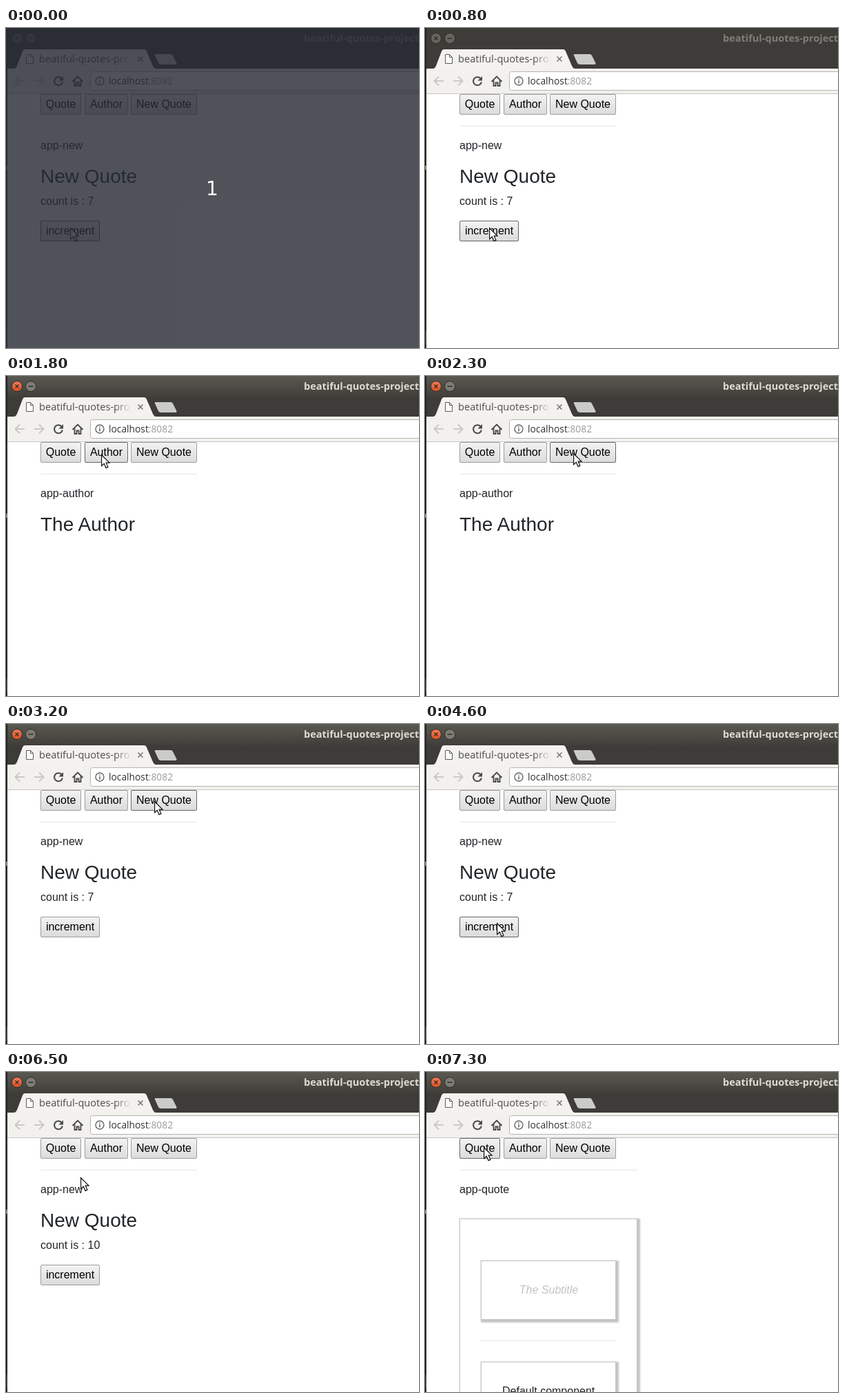
Recreate the animation shown at these times as an HTML page. Size 599 by 465 pixels, loop 8 s.

```html
<!DOCTYPE html>
<html lang="en">
<head>
<meta charset="utf-8">
<title>Quotes demo</title>
<style>
  html, body { margin: 0; width: 100%; height: 100%; overflow: hidden; background: #fff; }
  svg { display: block; }
  text { white-space: pre; }
  .ui { font-family: "Open Sans", "Noto Sans", sans-serif; }
  .page { font: 16px "Liberation Sans", Arial, sans-serif; fill: #212529; }
  .h2 { font-size: 28px; }
  .btn text { fill: #000; }
  .btn rect { fill: url(#face); stroke: #9c9c9c; }
  .btn.hover rect { stroke: #666; }
  .btn.down rect { fill: url(#faceDown); }
  .rule { fill: #e5e5e5; }
  .card rect { fill: #fff; stroke: #c8c8c8; }
  .card .shade { fill: #c4c4c4; stroke: none; filter: url(#soft); }
  .icon { fill: none; stroke: #484846; stroke-width: 2; }
  .off { stroke: #c9c9c5; }
</style>
</head>
<body>
<svg width="599" height="465" viewBox="0 0 599 465">
  <defs>
    <linearGradient id="bar" x2="0" y2="1">
      <stop stop-color="#5a5951"/><stop offset="1" stop-color="#3f3e39"/>
    </linearGradient>
    <linearGradient id="face" x2="0" y2="1">
      <stop stop-color="#f3f3f3"/><stop offset="1" stop-color="#dbdbdb"/>
    </linearGradient>
    <linearGradient id="faceDown" x2="0" y2="1">
      <stop stop-color="#d6d6d6"/><stop offset="1" stop-color="#ececec"/>
    </linearGradient>
    <linearGradient id="tabText" gradientUnits="userSpaceOnUse" x1="158" x2="182">
      <stop stop-color="#4c4b49"/><stop offset="1" stop-color="#4c4b49" stop-opacity="0"/>
    </linearGradient>
    <linearGradient id="orange" x2="0" y2="1">
      <stop stop-color="#f37f57"/><stop offset="1" stop-color="#dd4f22"/>
    </linearGradient>
    <filter id="soft" x="-10%" y="-10%" width="120%" height="120%"><feGaussianBlur stdDeviation="1"/></filter>
    <clipPath id="tabClip"><rect x="46" y="32" width="136" height="26"/></clipPath>
  </defs>

  <rect width="599" height="465" fill="#fff"/>
  <rect width="599" height="59" fill="#3d3c38"/>
  <rect id="bar-lit" width="599" height="31" fill="url(#bar)"/>
  <rect width="2" height="465" fill="#242321"/>
  <rect y="200" width="1.5" height="6" fill="#a39a8c"/>
  <rect y="440" width="2" height="20" fill="#3a3936"/>

  <!-- window controls -->
  <g stroke="#2f2e2a">
    <circle id="close" cx="16" cy="15" r="7.5"/>
    <circle id="mini" cx="36" cy="15" r="7.5"/>
    <path d="M13.5 12.5l5 5m0-5l-5 5M32.500 15h7" stroke-width="1.4"/>
  </g>
  <text id="title" class="ui" x="432" y="20" font-size="14.5" font-weight="700">beatiful-quotes-project</text>

  <!-- tab strip -->
  <path d="M12 59Q15 58 16 55L24 34Q25 31 28 31H200Q203 31 204 34L213 55Q214 58 217 59Z" fill="#f4f2f0"/>
  <path d="M217 38H239Q241 38 242 40L247.500 51Q248 53 246 53H225Q222 53 221 51L216 40Q215 38 217 38Z" fill="#cbcbc7"/>
  <path d="M29.500 38.500h6l4 4v9h-10zM35.500 38.500v4h4" fill="#fbfbfa" stroke="#5c5c5a"/>
  <g clip-path="url(#tabClip)">
    <text class="ui" x="48" y="50" font-size="14.6" fill="url(#tabText)">beatiful-quotes-project</text>
  </g>
  <path d="M191.500 41.500l7 7m0-7l-7 7" class="icon" stroke-width="1.6" style="stroke:#777;stroke-width:1.6"/>

  <!-- toolbar -->
  <rect x="2" y="59" width="597" height="36" fill="#f2f1ed"/>
  <rect x="2" y="95" width="597" height="1" fill="#c9c8c4"/>
  <path class="icon off" d="M27 77H14M20 70.500L13.500 77L20 83.500M41 77H54M48 70.500L54.500 77L48 83.500"/>
  <path class="icon" d="M80.500 73.200A6 6 0 1 0 81.900 78.500"/>
  <path d="M83 70v6.500h-6.500z" fill="#484846"/>
  <path class="icon" stroke-linejoin="miter" d="M96.500 78L104 70.500L111.500 78M99.500 76V84H102.500V79.500H105.500V84H108.500V76" style="stroke-width:1.8"/>
  <rect x="122.500" y="63.500" width="490" height="27" rx="3" fill="#fff" stroke="#b4b3af"/>
  <circle cx="136" cy="77" r="6" class="icon" style="stroke:#666;stroke-width:1.4"/>
  <path d="M135.200 76h1.600v4.500h-1.600zM135.200 73.200h1.600v1.600h-1.600z" fill="#666"/>
  <text class="ui" x="149" y="82" font-size="13.8" fill="#30302e">localhost<tspan fill="#999895">:8082</tspan></text>

  <g class="page">
    <g id="buttons"></g>
    <rect id="rule" class="rule" x="50" y="142" height="1"/>
    <text id="name" x="50" y="176"></text>
    <text id="head" class="h2" x="50" y="225"></text>
    <text id="count" x="50" y="257"></text>
    <g id="quote">
      <g class="card" id="cards"></g>
      <rect class="rule" x="81" y="390" width="196" height="1"/>
      <text x="179.500" y="322" text-anchor="middle" font-style="italic" style="fill:#c4c4c4">The Subtitle</text>
      <text x="112" y="469">Default component</text>
    </g>
  </g>

  <path id="cursor" d="M.6.8V16.600L4.300 13.200L7 19.600L9.900 18.400L7.200 12.200H12Z" fill="#fff" stroke="#111" stroke-width="1.2"/>

  <g id="intro">
    <rect width="599" height="465" fill="#272b33" fill-opacity=".81"/>
    <text x="299" y="243" text-anchor="middle" fill="#fff" style="font:28px 'DejaVu Sans',sans-serif">1</text>
  </g>
</svg>
<script>
const LOOP = 8000;
const $ = id => document.getElementById(id);

function add(parent, tag, attrs, text = '') {
  const el = document.createElementNS('http://www.w3.org/2000/svg', tag);
  for (const k in attrs) el.setAttribute(k, attrs[k]);
  el.textContent = text;
  return parent.appendChild(el);
}

// label, x, y, width, [pressed from, to]
const buttons = [
  ['Quote', 50, 96, 59, [7100, 7300]],
  ['Author', 114, 96, 63, [1600, 1800]],
  ['New Quote', 181, 96, 96, [0, 0]],
  ['increment', 50, 280, 86, [5100, 5200]]
].map(([label, x, y, w, press]) => {
  const el = add($('buttons'), 'g', {});
  add(el, 'rect', { x: x + .5, y: y + .5, width: w - 1, height: 29, rx: 1.5 });
  add(el, 'text', { x: x + w / 2, y: y + 20, 'text-anchor': 'middle' }, label);
  return { el, x, y, w, press };
});

for (const [x, y, w, h] of [[50, 213, 258, 300], [81, 274, 196, 86], [81, 421, 196, 86]]) {
  add($('cards'), 'rect', { class: 'shade', x, y, width: w + 4, height: h + 4 });
  add($('cards'), 'rect', { x: x + .5, y: y + .5, width: w - 1, height: h - 1 });
}

// Each row holds from its time until the next one.
const pointer = [
  [0, 93, 290], [1100, 100, 226], [1200, 112, 151], [1400, 134, 121], [1500, 138, 114],
  [1900, 148, 114], [2000, 166, 113], [2100, 188, 113], [2200, 207, 112], [2300, 215, 112],
  [4100, 216, 156], [4300, 192, 188], [4400, 152, 240], [4500, 115, 279], [4600, 104, 289],
  [6200, 112, 236], [6300, 120, 170], [6500, 108, 153], [6600, 98, 130], [6700, 88, 113], [6800, 85, 109]
];
const views = [[0, 'new'], [1800, 'author'], [3200, 'new'], [7300, 'quote']];
const counts = [[0, 7], [5200, 8], [5600, 9], [5800, 10]];
const heads = { new: 'New Quote', author: 'The Author', quote: '' };

const at = (steps, t) => steps.filter(s => s[0] <= t).pop();
const show = (el, on) => { el.style.display = on ? '' : 'none'; };

function draw(t) {
  const [, x, y] = at(pointer, t);
  const view = at(views, t)[1];
  const lit = t >= 1600;

  $('cursor').setAttribute('transform', `translate(${x} ${y})`);
  for (const b of buttons) {
    const hover = x >= b.x && x < b.x + b.w && y >= b.y && y < b.y + 30;
    const down = t >= b.press[0] && t < b.press[1];
    b.el.setAttribute('class', 'btn' + (hover ? ' hover' : '') + (down ? ' down' : ''));
  }
  show(buttons[3].el, view === 'new');
  show($('count'), view === 'new');
  show($('quote'), view === 'quote');
  show($('intro'), t < 800);
  show($('bar-lit'), lit);
  $('name').textContent = 'app-' + view;
  $('head').textContent = heads[view];
  $('count').textContent = 'count is : ' + at(counts, t)[1];
  $('rule').setAttribute('width', view === 'quote' ? 258 : 227);
  $('title').setAttribute('fill', lit ? '#dfdbd2' : '#807d78');
  $('close').setAttribute('fill', lit ? 'url(#orange)' : '#66655f');
  $('mini').setAttribute('fill', lit ? '#7d7c74' : '#66655f');
}

const start = performance.now();
function tick() {
  draw((performance.now() - start) % LOOP);
  requestAnimationFrame(tick);
}
tick();
</script>
</body>
</html>
```
